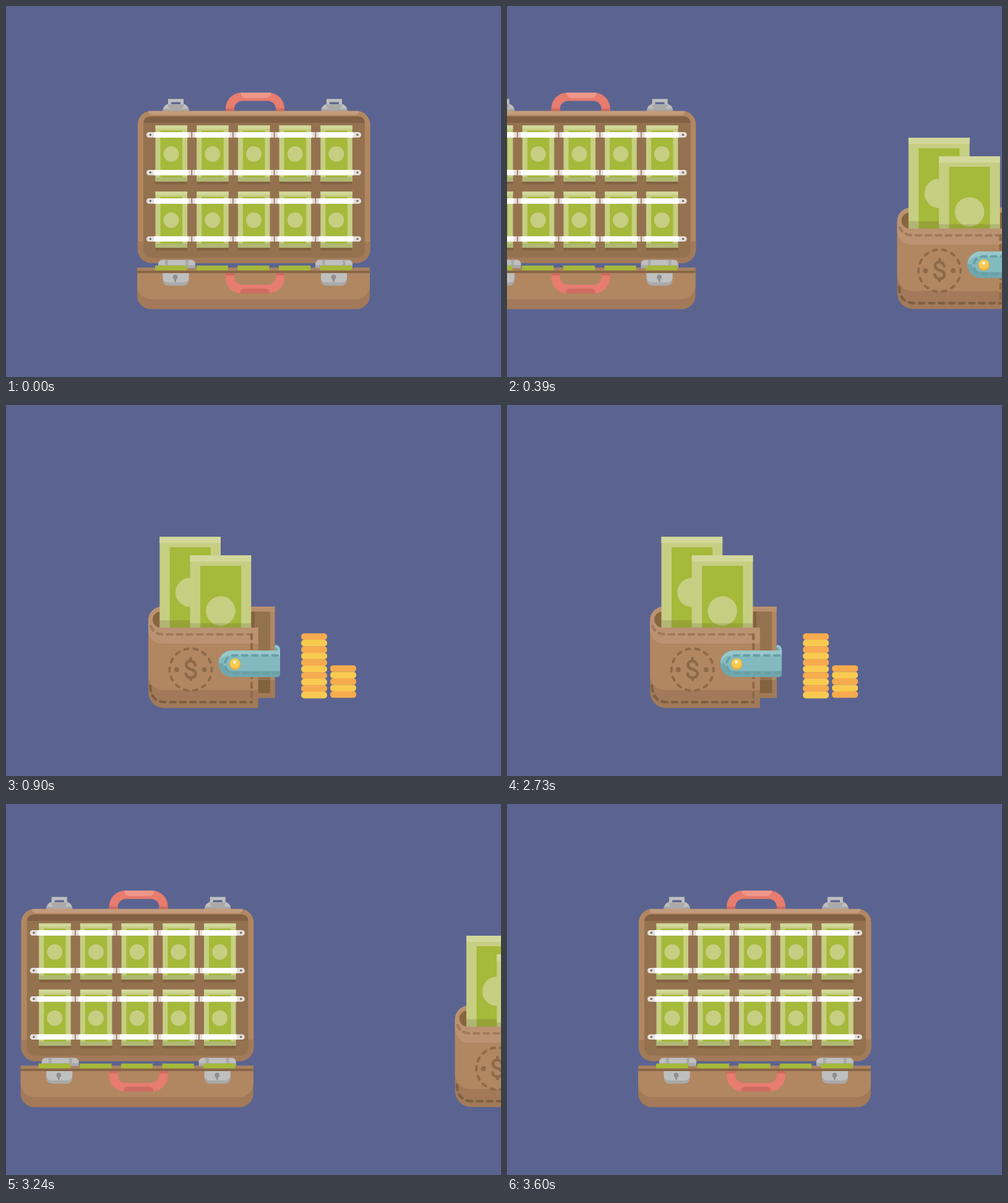
An HTML page that plays this animation: 800x600 px, repeating every 5.43 s.

```html
<!DOCTYPE html>
<html lang="en">
<head>
<meta charset="utf-8">
<title>Briefcase and wallet</title>
<style>
  html, body { margin: 0; width: 100%; height: 100%; overflow: hidden; background: #5b6491; }
  svg { display: block; width: 100%; height: 100%; }
</style>
</head>
<body>
<svg id="stage" viewBox="0 0 800 600"></svg>
<script>
const SKY = '#5b6491', BROWN = '#b18762', BROWN_SHADE = '#a27a59', INSIDE = '#95724f', DEEP = '#83623f';
const BILL = '#c6ce82', BILL_TOP = '#d2d89a', GREEN = '#a5b93a', BILL_SHADE = '#afb974';
const STEEL = '#bfbfbf', STEEL_SHADE = '#a9a9a9', RED = '#e77c6f', RED_SHADE = '#cf6c61';
const STITCH = '#8d6a48', TEAL = '#82babf', TEAL_LIGHT = '#97c7ca', TEAL_SHADE = '#71a7ac';

// Box with separate radii for its top and bottom corners.
const box = (x, y, w, h, fill, top = 0, bottom = 0) => {
  const arc = (r, dx, dy) => r ? `a${r} ${r} 0 0 1 ${dx} ${dy}` : '';
  return `<path fill="${fill}" d="M${x + top} ${y}H${x + w - top}${arc(top, top, top)}V${y + h - bottom}` +
    `${arc(bottom, -bottom, bottom)}H${x + bottom}${arc(bottom, -bottom, -bottom)}V${y + top}${arc(top, top, -top)}z"/>`;
};
const disc = (x, y, r, fill) => `<circle cx="${x}" cy="${y}" r="${r}" fill="${fill}"/>`;
const path = (d, fill) => `<path d="${d}" fill="${fill}"/>`;
const line = (d, color, width, dash = '', offset = 0) =>
  `<path d="${d}" fill="none" stroke="${color}" stroke-width="${width}" stroke-linecap="round" ` +
  `stroke-dasharray="${dash}" stroke-dashoffset="${offset}"/>`;
const repeat = (n, draw) => Array.from({ length: n }, (_, i) => draw(i)).join('');

const PITCH = 66.7;

const packedBill = (x, y) =>
  box(x, y + 91, 51.5, 4.5, '#846342') +
  box(x, y, 51.5, 91, BILL) +
  box(x, y, 51.5, 5.5, BILL_TOP) +
  box(x + 8, y + 8.5, 35.5, 75.5, GREEN) +
  box(x, y + 84, 51.5, 7, BILL_SHADE) +
  disc(x + 25.5, y + 46.3, 12.5, BILL);

const band = y =>
  box(227, y, 347, 8.7, '#e5e0dc', 4.3, 4.3) +
  repeat(5, i => box(239 + PITCH * i, y, 55.5, 8.7, '#fff')) +
  repeat(4, i => box(299.3 + PITCH * i, y, 1.8, 8.7, BROWN_SHADE)) +
  [233.3, 568].map(x => disc(x, y + 4.3, 1.7, '#6f6a68')).join('');

const topLatch = x =>
  box(x, 158, 42, 12, STEEL, 11.5) +
  box(x, 166, 42, 4, STEEL_SHADE) +
  box(x + 8.5, 158, 25, 8, STEEL_SHADE, 0, 5) +
  box(x + 8.5, 150.3, 25, 9, STEEL) +
  box(x + 13.5, 155.5, 15, 3.3, SKY);

const hinge = x =>
  box(x, 410.5, 60, 13, STEEL, 6.5) +
  box(x, 419, 60, 4.5, STEEL_SHADE) +
  box(x + 11, 410.5, 5, 13, STEEL_SHADE) +
  box(x + 44, 410.5, 5, 13, STEEL_SHADE);

const lock = (x, keyX) =>
  box(x, 432, 42, 20.3, STEEL_SHADE, 0, 9) +
  box(x, 432, 42, 15, STEEL, 0, 8) +
  disc(keyX, 438.5, 3.9, '#8f8f8f') +
  box(keyX - 1.5, 439, 3, 7.3, '#8f8f8f', 0, 1);

const handles =
  path('M355 170V166A26 26 0 0 1 381 140H424A26 26 0 0 1 450 166V170H436V166.5A13 13 0 0 0 423 153.5H382A13 13 0 0 0 369 166.5V170z', RED) +
  box(379.5, 140, 48.5, 8.7, '#ef968b', 0, 8) +
  box(355, 165.5, 14, 4.5, RED_SHADE) + box(436, 165.5, 14, 4.5, RED_SHADE) +
  path('M355 432V439A26 26 0 0 0 381 465H424A26 26 0 0 0 450 439V432H436V438A13 13 0 0 1 423 451H382A13 13 0 0 1 369 438V432z', RED) +
  box(378.5, 457, 48, 8, RED_SHADE, 7) +
  box(355, 432, 14, 4, RED_SHADE) + box(436, 432, 14, 4, RED_SHADE);

const briefcase =
  topLatch(253.5) + topLatch(509.5) +
  box(212.8, 169.7, 375.8, 246, BROWN, 22, 22) +
  box(212.8, 381, 375.8, 34.7, BROWN_SHADE, 0, 22) +
  box(230, 169.7, 341, 6.5, '#c29c7c', 0, 6) +
  box(222, 178.5, 358, 228.5, INSIDE, 12, 12) +
  box(222, 178.5, 358, 10.5, '#826143', 10.5) +
  repeat(10, i => packedBill(241.5 + PITCH * (i % 5), i < 5 ? 193 : 300)) +
  [204, 265, 311, 372.4].map(band).join('') +
  box(212, 423, 376, 67.3, BROWN_SHADE, 0, 22) +
  box(212, 428, 376, 46, BROWN, 0, 22) +
  box(212, 423, 376, 5, '#a98260') +
  box(212, 428, 376, 4, '#886646') +
  hinge(246) + hinge(500) +
  repeat(5, i => box(241 + 66.6 * i, 419.7, 51.3, 7.8, GREEN)) +
  handles + lock(253.5, 273.5) + lock(509, 529.5);

const looseBill = (x, y, shadeY) =>
  box(x, y, 98.7, 360 - y, BILL) +
  box(x, y, 98.7, 10.3, BILL_TOP) +
  box(x + 16.5, y + 17, 66, 343 - y, GREEN) +
  disc(x + 49.5, y + 90, 23.8, BILL) +
  box(x, shadeY, 98.7, 360 - shadeY, 'rgba(70,60,40,.16)');

const coins = (x, y, n) => repeat(n, i =>
  box(x, y + 10.5 * i, 42, 10.7, i % 2 ? '#f9ca50' : '#f7ab4f', 5, 5));

const wallet =
  // Back flap and opening
  box(250, 326, 184.5, 147.5, BROWN) +
  box(250, 326, 184.5, 8, '#b98f6d') +
  box(395, 445, 39.5, 28.5, BROWN_SHADE) +
  box(396, 334, 31, 132, INSIDE) +
  box(396, 334, 6, 132, '#84633f') +
  box(396, 445, 31, 21, DEEP) +
  // Front
  path('M230 348A22 22 0 0 1 252 326H300V360H407.5V490H256A26 26 0 0 1 230 464z', BROWN_SHADE) +
  path('M230 348V437A24 24 0 0 0 254 461H407.5V360H252z', BROWN) +
  path('M230 348A22 22 0 0 1 252 326H300V360H407.5V386H252A22 22 0 0 1 230 364z', '#bb9272') +
  path('M300 334H250A13 13 0 0 0 250 360H300z', '#87653f') +
  looseBill(248.3, 213, 348) + looseBill(297.5, 243, 353) +
  // Seams and badge
  line('M234 358Q239 371 257 371H397', '#a07a5b', 4.2, '8.5 7.7', 1) +
  line('M397 371V481', STITCH, 4.2, '7.5 8.2') +
  line('M233 454Q234 480.5 258 480.5H397', '#7f5f41', 4.2, '8.5 7.7') +
  line('M332.5 428A34 34 0 1 1 264.5 428A34 34 0 1 1 332.5 428', STITCH, 4, '6.26 9', 3.1) +
  disc(275.8, 428, 4, STITCH) + disc(320.5, 428, 4, STITCH) +
  line('M306 420.5C304 411.5 291.3 412 291.3 420.3C291.3 429.5 306.5 425.5 306.5 434.5C306.5 443.5 291.5 443 290.8 434.5M298.5 409.5V413M298.5 441V444.5', STITCH, 4.6) +
  // Strap
  path('M434.5 388Q443 388 443 397V402H434.5z', TEAL_LIGHT) +
  path('M434.5 391.5Q439.5 392 439.5 398H434.5z', TEAL_SHADE) +
  '<clipPath id="strap"><path d="M365 397H443V435Q443 440 438 440H365A21.5 21.5 0 0 1 365 397z"/></clipPath>' +
  '<g clip-path="url(#strap)">' +
  box(343, 397, 100, 43, TEAL_SHADE) +
  path('M343 397H443V430H368Q352 430 351 418Q347 417 343.5 418z', TEAL) +
  path('M343 418Q347 405 364 405H443V397H343z', TEAL_LIGHT) +
  line('M443 405H368A14 14 0 0 0 368 433.5H443', '#69a0a5', 3.8, '8.5 7.8', -4) +
  '</g>' +
  disc(370, 419, 9.2, '#eeae3c') + disc(370, 417.8, 7.9, '#f9ca50') + disc(369.5, 415.5, 2.5, '#fff6df') +
  coins(477, 369.3, 10) + coins(524, 420.9, 5);

const stage = document.getElementById('stage');
stage.innerHTML = `<g>${briefcase}</g><g>${wallet}</g>`;
const [caseGroup, walletGroup] = stage.children;

const LOOP = 5430, STEP = 30, RETURN = 2700, SLIDE = 900, DISTANCE = 684;

// Cubic Bézier easing (.463, 0, .475, 1), solved by bisection.
function ease(x) {
  if (x <= 0 || x >= 1) return x <= 0 ? 0 : 1;
  let low = 0, high = 1, u;
  for (let i = 0; i < 30; i++) {
    u = (low + high) / 2;
    const at = 3 * (1 - u) ** 2 * u * .463 + 3 * (1 - u) * u * u * .475 + u ** 3;
    if (at < x) low = u; else high = u;
  }
  return u * u * (3 - 2 * u);
}

function draw(now) {
  const t = Math.floor(now % LOOP / STEP) * STEP;
  const progress = t < RETURN ? ease(t / SLIDE) : 1 - ease((t - RETURN) / SLIDE);
  const shift = DISTANCE * progress;
  caseGroup.setAttribute('transform', `translate(${-shift} 0)`);
  walletGroup.setAttribute('transform', `translate(${DISTANCE - shift} 0)`);
}

const start = performance.now();
function tick() {
  draw(performance.now() - start);
  requestAnimationFrame(tick);
}
tick();
</script>
</body>
</html>
```
